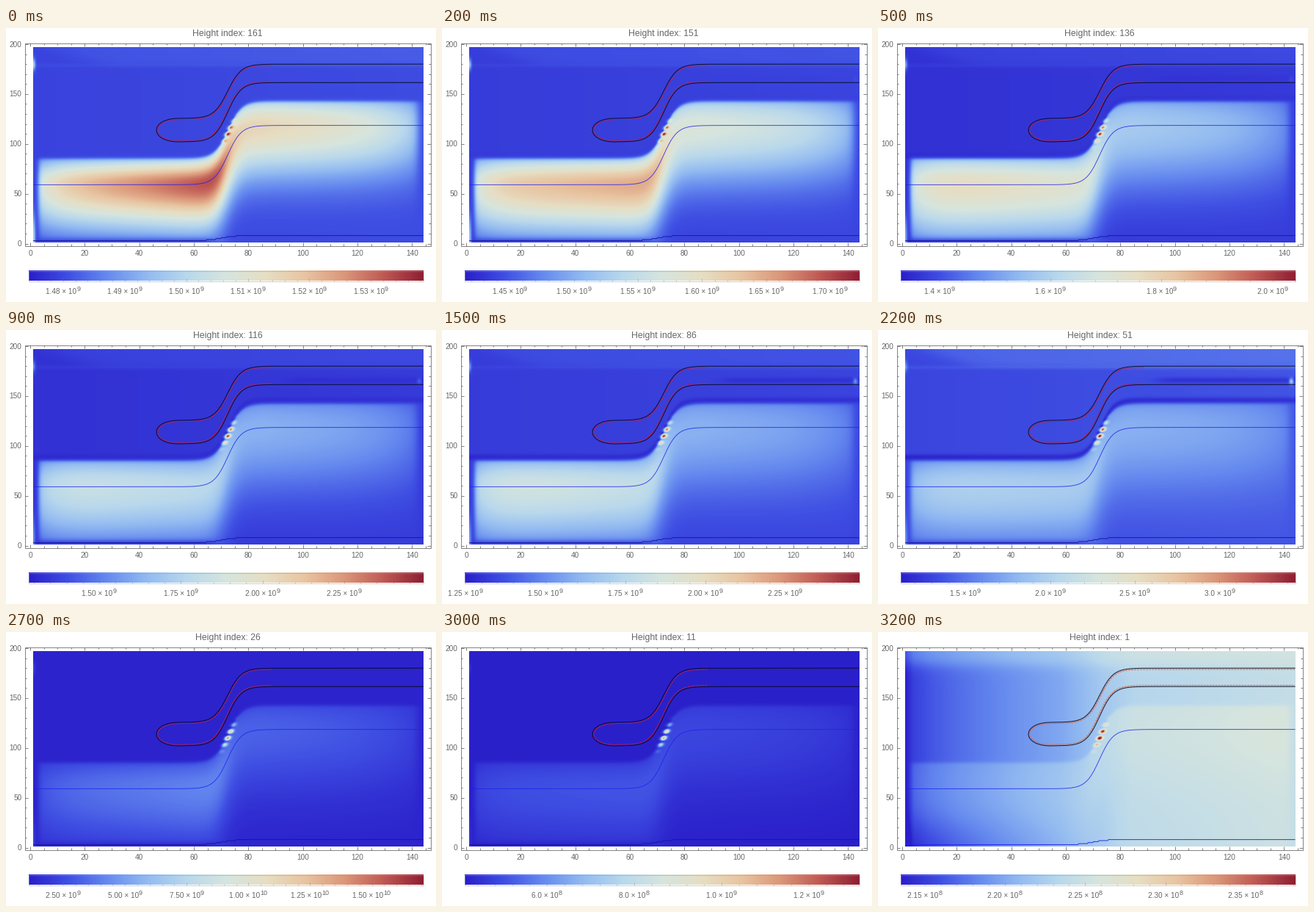
Animation of 586x373 px, one loop 3.3 s. Source, as a matplotlib script:

```python
import math

import matplotlib.pyplot as plt
import numpy as np
from matplotlib.animation import FuncAnimation
from matplotlib.collections import LineCollection
from matplotlib.colors import LinearSegmentedColormap
from matplotlib.patches import Rectangle

W, H, DPI = 586, 373, 100
FRAMES, STEP_MS = 33, 100
PT = 72 / DPI
GRAY = "#666666"
X0, X1, Y0, Y1 = 25.5, 578.5, 20.5, 296.5  # plot frame

plt.rcParams["font.family"] = "Liberation Sans"

THERMO = LinearSegmentedColormap.from_list("thermo", [
    "#2a1fca", "#3f4fe3", "#668bef", "#93bbf1", "#b9d8ec", "#d6e5de",
    "#e6dec4", "#e8c5a2", "#db9779", "#bf5954", "#8f1f33"], N=512)

# Height index, then legend limits and field levels at that height.
KEYS = np.array([
    # idx   lo      hi      bg   left right tilt  strip band spots spread
    [1,   .2135e9, .2381e9, .00, .06, .05, .00, .00, .00, .75, 58],
    [26,  1.10e9, 17.08e9,  .01, .17, .13, .20, .00, .00, .75, 58],
    [51,  1.118e9, 3.447e9, .08, .36, .26, -.08, .05, .07, .85, 58],
    [86,  1.248e9, 2.482e9, .06, .46, .27, -.12, .03, .04, .75, 58],
    [116, 1.284e9, 2.492e9, .04, .43, .27, -.12, .03, .02, .75, 58],
    [136, 1.330e9, 2.041e9, .04, .58, .34, -.12, .03, .01, .70, 56],
    [161, 1.4744e9, 1.5385e9, .075, .81, .62, .20, .03, .00, .55, 43],
])


def levels(idx):
    col = KEYS[:, 0]
    lo, hi = (math.exp(np.interp(idx, col, np.log(KEYS[:, j]))) for j in (1, 2))
    return lo, hi, [np.interp(idx, col, KEYS[:, j]) for j in range(3, 11)]


def px(x):
    return 33 + 3.716 * np.asarray(x)


def py(y):
    return 293.5 - 1.3575 * np.asarray(y)


def sig(z):
    return 0.5 * (1 + np.tanh(z / 2))


def rise(x, mid=72.4, w=5.0):
    return 0.5 * (1 + np.tanh((x - mid) / w))


def bell(z):
    return np.exp(-z ** 2)


X, Y = np.meshgrid(np.linspace(1, 144, 532), np.linspace(197, 1, 266))
EDGE = 85 + 57.5 * rise(X)
D = Y - (59 + 59.5 * rise(X))
TURN = sig((X - 72 - 0.06 * D) / 1.9)
ENDS = (1 - 0.4 * np.exp(-(X - 1) / 7)) * sig((Y - 4) / 1.5)
U = np.clip((X - 85) / 59, 0, 1)
FADE = 1 - 0.25 * U - 0.35 * U ** 4
INSIDE = sig((EDGE - Y) / 1.0) * sig((X - 3) / 0.5) * sig((142 - X) / 0.9)
TOP = sig((Y - 180) / 1.5) * sig((X + Y - 204) / 4)
SPOTS = (bell(X - 72.6 - 0.16 * (Y - 112)) * bell((Y - 112) / 10)
         * (0.5 + 0.5 * np.cos(2 * np.pi * (Y - 109.7) / 7)))
RIM = bell((X - 1) / 0.7)
FLOOR = np.interp(X, [1, 4, 10, 20, 40, 58, 66, 72, 78, 84, 110, 144],
                  [0, .07, .11, .15, .21, .26, .30, .34, .38, .41, .43, .46])


def near_floor():
    v = FLOOR + INSIDE * (0.03 + 0.045 * bell(D / 60)) - 0.02 * TURN
    v -= 0.08 * bell(Y / 30) * np.clip(1 - X / 72, 0, 1)
    return v + (0.12 - 0.07 * X / 144) * sig((Y - 184) / 4)


def aloft(bg, left, right, tilt, strip, band, spread):
    under = D < 0
    a = bell(D / np.where(under, spread, 0.6 * spread)) * ENDS
    b = bell(D / np.where(under, spread + 7, 0.75 * spread)) * FADE
    a = a * (left * (1 + tilt * (X - 40) / 40) - bg)
    v = bg + INSIDE * ((1 - TURN) * a + TURN * b * (right - bg))
    v += strip * (TOP + 0.5 * bell((Y - 179) / 2) + 0.6 * X / 144)
    v -= band * (bell((Y - EDGE - 3.5) / 3)
                 + 0.9 * bell((Y - 166) / 3) * sig((X - 94) / 2))
    v += RIM * left * 0.35 * (bell((Y - 180) / 6) + bell((Y - 6) / 22))
    return v + band * 4 * bell((X - 142.6) / 0.8) * bell((Y - 165) / 3)


def field(idx):
    *shape, spots, spread = levels(idx)[2]
    v = near_floor() if idx == 1 else aloft(*shape, spread)
    return np.clip(v + spots * SPOTS, 0, 1)


def tube():
    x = np.linspace(144, 55, 260)
    a = np.linspace(0, np.pi, 60)[1:-1]
    xs = np.concatenate([x, 55 - 8.7 * np.sin(a) ** 0.85, x[::-1]])
    ys = np.concatenate([125.6 + 54.4 * rise(x), 113.8 + 11.8 * np.cos(a),
                         102 + 59.5 * rise(x[::-1])])
    return px(xs), py(ys)


def inset(x, y, dist):
    dx, dy = np.gradient(x), np.gradient(y)
    n = np.hypot(dx, dy)
    return x + dist * dy / n, y - dist * dx / n


fig = plt.figure(figsize=(W / DPI, H / DPI), dpi=DPI, facecolor="white")
ax = fig.add_axes([0, 0, 1, 1])
ax.set_axis_off()

image = ax.imshow(field(161), cmap=THERMO, vmin=0, vmax=1, aspect="auto",
                  extent=(37, 568.5, 292, 26), interpolation="bilinear")
ax.imshow(np.linspace(0, 1, 537)[None], cmap=THERMO, aspect="auto",
          extent=(31, 568.5, 344.5, 330.5))
ax.set_xlim(0, W)
ax.set_ylim(H, 0)


def box(x0, y0, x1, y1, color, lw=0.8):
    ax.add_patch(Rectangle((x0, y0), x1 - x0, y1 - y0, fill=False,
                           ec=color, lw=lw * PT, zorder=4))


def label(x, y, text="", size=10.0, **kw):
    return ax.text(x, y, text, fontsize=size * PT, color=GRAY,
                   va="center_baseline", **kw)


box(X0, Y0, X1, Y1, GRAY)
box(31, 330.5, 568.5, 344.5, "#a0a0a8", 0.5)

ticks = []
for t in range(0, 146, 5):
    n = 2.5 if t % 20 else 4.5
    ticks += [[(px(t), Y1), (px(t), Y1 - n)], [(px(t), Y0), (px(t), Y0 + n)]]
    if t % 20 == 0:
        label(px(t), 306.5, str(t), ha="center")
for t in range(0, 201, 10):
    n = 2.5 if t % 50 else 4.5
    ticks += [[(X0, py(t)), (X0 + n, py(t))], [(X1, py(t)), (X1 - n, py(t))]]
    if t % 50 == 0:
        label(21.5, py(t) - 0.5, str(t), ha="right")
ax.add_collection(LineCollection(ticks, colors=GRAY, linewidths=0.8 * PT, zorder=4))

xs = np.linspace(1.2, 144, 500)
ax.plot(px(xs), py(59 + 59.5 * rise(xs)), color="#2020f0", lw=0.9 * PT, alpha=0.85)
bed, = ax.plot(px(xs), py(np.round(3 + 5 * rise(xs, 70))), lw=0.9 * PT)
tx, ty = tube()
rx, ry = inset(tx, ty, 1.7)
ax.plot(tx, ty, color="#08081c", lw=1.0 * PT, alpha=0.9)
red, = ax.plot(rx, ry, lw=1.0 * PT, ls=(0, (3, 1)))

title = label(302, 7, size=12.2, ha="center")


def power_label():
    base = label(0, 358.5, ha="center")
    top = ax.annotate("", xy=(1, 0.5), xycoords=base, fontsize=9 * PT,
                      color=GRAY, ha="left", va="bottom")
    return base, top


bar_text = [power_label() for _ in range(8)]
bar_ticks = LineCollection([], colors="#777777", linewidths=0.7 * PT,
                           alpha=0.5, zorder=5)
ax.add_collection(bar_ticks)


def nice_step(span):
    k = 10.0 ** math.floor(math.log10(span))
    steps = [m * s for s in (k / 10, k) for m in (1, 2, 2.5, 5)]
    return min(steps, key=lambda s: abs(span / s - 5))


def exponent(v):
    return math.floor(math.log10(v) + 1e-9)


def draw_legend(lo, hi):
    step = nice_step(hi - lo)
    fine = step / 5
    top = math.floor(hi / step) * step
    unit = step / 10.0 ** exponent(top)
    places = next(p for p in range(1, 6)
                  if abs(unit * 10 ** p - round(unit * 10 ** p)) < 1e-6)
    marks, texts = [], []
    for n in range(math.ceil(lo / fine), math.floor(hi / fine) + 1):
        x = 31 + 537.5 * (n * fine - lo) / (hi - lo)
        marks.append([(x, 344.5), (x, 344.5 - (2 if n % 5 else 3.5))])
        if n % 5 == 0:
            e = exponent(n * fine)
            texts.append((x, f"{n * fine / 10.0 ** e:.{places}f} × 10", str(e)))
    bar_ticks.set_segments(marks)
    for i, (base, power) in enumerate(bar_text):
        used = i < len(texts)
        base.set_visible(used)
        power.set_visible(used)
        if used:
            x, s, e = texts[i]
            base.set_text(s)
            base.set_x(x - 2.5 * len(e))
            power.set_text(e)


def update(n):
    idx = 161 - 5 * n
    last = idx == 1
    image.set_data(field(idx))
    title.set_text(f"Height index: {idx}")
    bed.set_color("#2020f0" if last else "#1414a8")
    red.set_data(np.where((rx < 362) | last, rx, np.nan), ry)
    red.set_color("#e0683c" if last else "#c81c3c")
    draw_legend(*levels(idx)[:2])
    return []


anim = FuncAnimation(fig, update, frames=FRAMES, interval=STEP_MS,
                     repeat=True, repeat_delay=0, blit=False)
plt.show()
```
